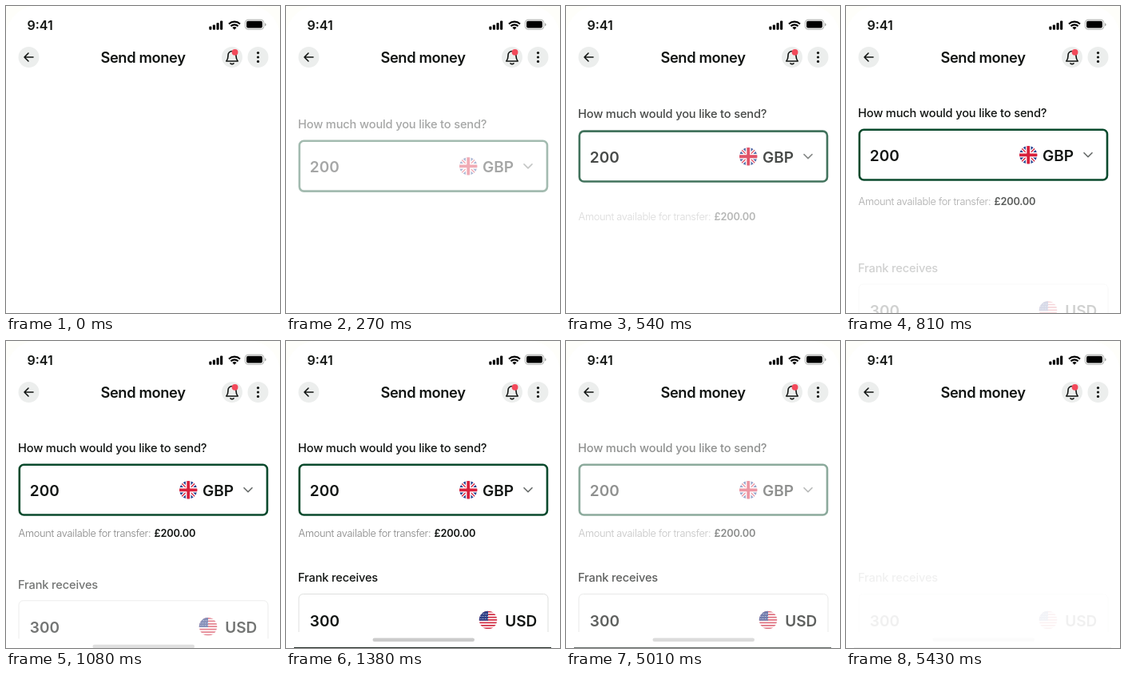
Write an HTML page that moves like this. It is 343 px wide and 384 px high and loops after 6090 ms.

```html
<!DOCTYPE html>
<html lang="en">
<head>
<meta charset="utf-8">
<title>Send money</title>
<style>
  html, body { margin: 0; width: 100%; height: 100%; overflow: hidden; background: #fefefa; }
  svg { display: block; width: 343px; height: 384px; font-family: Inter, "Open Sans", sans-serif; fill: #111412; }
  .line { fill: none; stroke: #111412; stroke-width: 1.6; stroke-linecap: round; stroke-linejoin: round; }
  .label { font-size: 14.63px; font-weight: 500; letter-spacing: -.011em; }
  .big { font-size: 19px; font-weight: 600; }
  .note { font-size: 12.8px; font-weight: 300; letter-spacing: -.3px; fill: #858585; }
  .sum { font-size: 12.8px; font-weight: 600; letter-spacing: -.2px; }
</style>
</head>
<body>
<svg viewBox="0 0 343 384">
  <defs>
    <clipPath id="round"><circle r="11.2"/></clipPath>
  </defs>
  <rect width="343" height="430" rx="38" fill="#fff"/>

  <!-- status bar -->
  <text x="26.5" y="30" font-size="16" font-weight="600">9:41</text>
  <g fill="#000">
    <rect x="254.3" y="25.6" width="3.1" height="4.1" rx=".9"/>
    <rect x="258.9" y="23.4" width="3.1" height="6.3" rx=".9"/>
    <rect x="263.5" y="21" width="3.1" height="8.7" rx=".9"/>
    <rect x="268.1" y="18.4" width="3.1" height="11.3" rx=".9"/>
    <path d="M286 29.8l-2.6-2.7a3.9 3.9 0 0 1 5.2 0z"/>
    <rect x="301" y="18.8" width="20" height="8.8" rx="2"/>
  </g>
  <path d="M279 22.4a10.2 10.2 0 0 1 14 0M281.4 25.2a6.8 6.8 0 0 1 9.2 0" fill="none" stroke="#000" stroke-width="2.1"/>
  <rect x="299.4" y="17.2" width="23.3" height="12" rx="3.6" fill="none" stroke="#a8aaa8"/>
  <path d="M324 21.2q1.6.6 1.6 2t-1.6 2z" fill="#a8aaa8"/>

  <!-- title bar -->
  <g fill="#eceeed">
    <circle cx="28.5" cy="64" r="13"/>
    <circle cx="283" cy="64" r="13"/>
    <circle cx="315.5" cy="64" r="13"/>
  </g>
  <path class="line" d="M34 64H23M28 59l-5 5 5 5"/>
  <text x="171.5" y="71" text-anchor="middle" font-size="18.3" font-weight="600" letter-spacing="-.37">Send money</text>
  <path class="line" d="M275.8 69H290.2Q288 66.5 288 62.5V61.5A5 5 0 0 0 278 61.5V62.5Q278 66.5 275.8 69ZM281 71.8Q283 73.4 285 71.8"/>
  <circle cx="286.6" cy="57.8" r="3.9" fill="#f2495a"/>
  <circle cx="315.5" cy="58.6" r="1.6"/>
  <circle cx="315.5" cy="64" r="1.6"/>
  <circle cx="315.5" cy="69.4" r="1.6"/>

  <g id="send">
    <text class="label" x="15" y="138.5">How much would you like to send?</text>
    <rect x="16.8" y="154.7" width="310.2" height="62.8" rx="5.5" fill="#fff" stroke="#0a4a2d" stroke-width="2.6"/>
    <text class="big" x="29.8" y="193.8">200</text>
    <g transform="translate(228.2 186.3)" clip-path="url(#round)">
      <circle r="11.2" fill="#24408e"/>
      <path d="M-12-12L12 12M12-12L-12 12" stroke="#fff" stroke-width="4"/>
      <path d="M-12-12L12 12M12-12L-12 12" stroke="#d8203c" stroke-width="1.3"/>
      <path d="M0-12V12M-12 0H12" stroke="#fff" stroke-width="6.6"/>
      <path d="M0-12V12M-12 0H12" stroke="#d8203c" stroke-width="3.8"/>
    </g>
    <text class="big" x="246" y="193.8">GBP</text>
    <path class="line" d="M298 183.7l5 5 5-5" style="stroke:#666a68"/>
  </g>

  <g id="available">
    <text class="note" x="15.6" y="245">Amount available for transfer:</text>
    <text class="sum" x="185.6" y="245">£200.00</text>
  </g>

  <g id="receive">
    <text class="label" x="15" y="301.3">Frank receives</text>
    <rect x="16" y="316.5" width="312" height="64" rx="5.5" fill="#fff" stroke="#dedfde"/>
    <text class="big" x="29.8" y="356.8">300</text>
    <g transform="translate(253 349)" clip-path="url(#round)">
      <circle r="11.2" fill="#fff"/>
      <path d="M0-11.2V11.2" stroke="#d22f45" stroke-width="24" stroke-dasharray="1.72"/>
      <path d="M-12-12H0V.8H-12Z" fill="#2f3f86"/>
      <path d="M-8.5-7.5H0M-9.5-4.5H0M-9.5-1.5H0" stroke="#fff" stroke-width=".9" stroke-dasharray=".9 1.8"/>
    </g>
    <text class="big" x="274.2" y="356.8">USD</text>
    <rect x="10" y="364" width="322" height="20" fill="#fff"/>
    <rect x="108.5" y="371.4" width="127.5" height="4.6" rx="2.3" fill="#cbcbcb"/>
    <rect x="10" y="383" width="322" height="1" fill="#26302b"/>
  </g>
</svg>
<script>
const LOOP = 6090;
const items = [
  { id: "send", start: 15, rise: 36, leave: 4670, fade: 640, rest: 0 },
  { id: "available", start: 335, rise: 48, leave: 4690, fade: 625, rest: 0 },
  { id: "receive", start: 680, rise: 48, leave: 4790, fade: 680, rest: .06 }
];
const ENTER = 685;
const progress = (t, start, length) => Math.min(1, Math.max(0, (t - start) / length));

function draw(now) {
  const t = now % LOOP;
  for (const { id, start, rise, leave, fade, rest } of items) {
    const p = progress(t, start, ENTER);
    const opacity = t < leave ? p : Math.max(rest, 1 - progress(t, leave, fade));
    const node = document.getElementById(id);
    node.setAttribute("opacity", opacity);
    node.setAttribute("transform", `translate(0 ${rise * (1 - p) ** 2})`);
  }
}

const began = performance.now();
function tick() {
  draw(performance.now() - began);
  requestAnimationFrame(tick);
}
tick();
</script>
</body>
</html>
```
